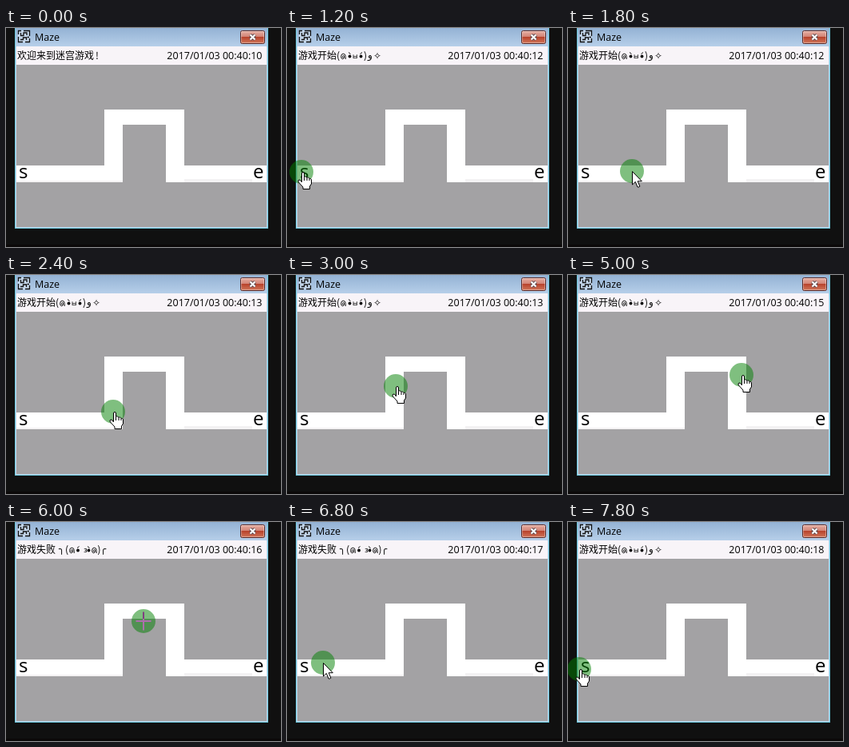
Write an HTML page that moves like this. It is 344 px wide and 274 px high and loops after 8 s.

```html
<!DOCTYPE html>
<html lang="zh-CN">
<head>
<meta charset="utf-8">
<title>Maze</title>
<style>
  html, body { margin: 0; width: 100%; height: 100%; overflow: hidden; background: #101010; }
  svg { display: block; width: 344px; height: 274px; }
  text { font: 12.5px "Open Sans", "Noto Sans", sans-serif; white-space: pre; }
  .zh { font: 12px "Noto Sans CJK SC", "Noto Sans CJK", sans-serif; }
  .sym { font: 12px "DejaVu Sans", sans-serif; }
  .mark { font-size: 24px; }
  .line { fill: none; stroke: #111; }
  .skin { fill: #fff; stroke: #000; }
  #cross { mix-blend-mode: difference; stroke: #fff; stroke-width: 2; }
</style>
</head>
<body>
<svg viewBox="0 0 344 274">
  <defs>
    <linearGradient id="bar" x2="0" y2="1">
      <stop stop-color="#94b2d4"/><stop offset="1" stop-color="#b8d0ea"/>
    </linearGradient>
    <linearGradient id="red" x2="0" y2="1">
      <stop stop-color="#e6b0a4"/><stop offset=".48" stop-color="#d28274"/>
      <stop offset=".5" stop-color="#b8432c"/><stop offset="1" stop-color="#d2785c"/>
    </linearGradient>
    <path id="curl" class="line" d="M3.6 6.2A1.3 1.3 0 1 1 4.6 4Q5 7.5 2.6 7.8Q.6 7.6.6 4.6Q.8 1.2 3.4 1.2Q6.3 1.4 6.2 4.6V8"/>
    <g id="eye"><circle cx="2.5" cy="5.5" r="1.9"/><path class="line" d="M1 .5L3.5 2.5"/></g>
  </defs>

  <rect width="344" height="274" fill="#101010"/>
  <rect y="271" width="344" height="3" fill="#0b0909"/>

  <!-- window -->
  <rect x="11" width="317" height="251" fill="#6cc8dc"/>
  <rect x="12" width="315" height="250" fill="#c2d8ee"/>
  <rect x="12" width="315" height="24" fill="url(#bar)"/>
  <rect x="13" y="23" width="313" height="23" fill="#f8f4f8"/>
  <rect x="13" y="46" width="313" height="203" fill="#a3a2a4"/>

  <rect x="15" y="3" width="15" height="15" fill="#c4d6ea"/>
  <path class="line" stroke-width="1.3" d="M19 3.5H15.5V8M22 3.5H29.5V10M15.5 11V17.5H21M24 17.5H29.5V13M18.5 6V9.5H22V6H26V9M18 14.5H21.5V12H25.5V15M26.5 11.5H29"/>
  <text x="36" y="16">Maze</text>
  <rect x="293.5" y="3.5" width="30" height="16" rx="2" fill="url(#red)" stroke="#5c2a28"/>
  <rect x="294.5" y="4.5" width="28" height="14" rx="1" fill="none" stroke="#fff" stroke-opacity=".35"/>
  <path d="M305.5 8.5L311.5 14.5M311.5 8.5L305.5 14.5" stroke="#5b4a50" stroke-width="4"/>
  <path d="M305.5 8.5L311.5 14.5M311.5 8.5L305.5 14.5" stroke="#fff" stroke-width="2.2"/>

  <!-- maze -->
  <path fill="#fff" d="M13 172H123V102H223V172H326V193H200V121H146V193H13Z"/>
  <path fill="#f3f2f3" d="M13 191H146V193H13ZM223 189H308V193H223Z"/>
  <text class="mark" x="16" y="188">s</text>
  <text class="mark" x="309" y="188">e</text>

  <!-- status line -->
  <text id="clock" x="320.5" y="39" text-anchor="end"></text>
  <g id="hello">
    <text class="zh" x="14" y="39">欢迎来到迷宫游戏</text>
    <text class="zh" x="112" y="39">!</text>
  </g>
  <g id="play">
    <text class="zh" x="14" y="39">游戏开始</text>
    <text class="zh" x="62" y="39">(</text>
    <use href="#curl" x="67" y="31"/>
    <use href="#eye" x="76" y="30"/>
    <text class="zh" x="81" y="39" style="font-size:9px">ㅂ</text>
    <use href="#eye" transform="matrix(-1 0 0 1 95 30)"/>
    <text class="zh" x="96" y="39">)</text>
    <text class="sym" x="101" y="38">و</text>
    <text class="sym" x="108" y="39">✧</text>
  </g>
  <g id="fail">
    <text class="zh" x="14" y="39">游戏失败</text>
    <text class="sym" x="66" y="38">╮</text>
    <text class="zh" x="74" y="39">(</text>
    <use href="#curl" x="79" y="31"/>
    <use href="#eye" transform="matrix(-1 0 0 1 92.500 30)"/>
    <text class="sym" x="97" y="38">₃</text>
    <use href="#eye" x="101" y="30"/>
    <use href="#curl" x="107" y="31"/>
    <text class="zh" x="114.500" y="39">)</text>
    <text class="sym" x="118" y="38">╭</text>
  </g>

  <!-- pointer -->
  <circle id="halo" r="15" fill="#008000" fill-opacity=".5"/>
  <path id="arrow" class="skin" d="M.5 .5V17L4.300 13.400L7 20H8.500L9.900 19.200L7.200 12.700H12.300Z"/>
  <path id="hand" class="skin" d="M.5 12.500V2Q.5 .5 2 .5T3.500 2V6.500Q4 5.500 5.500 6T7 7.500Q7.500 6.500 8.500 7T10 8.500Q10.500 8 11.500 8.500T12.500 10V15L10.500 18V21.500H2V19L-3.500 13Q-5 10.500-3 10T.5 13M3.500 6.500V11M7 7.500V11M10 8.500V11"/>
  <path id="cross" d="M0-11.500V11.500M-9.500 0H9.500"/>
</svg>
<script>
  const $ = id => document.getElementById(id);
  const LOOP = 8000, TICK = 200;
  const shapes = ['arrow', 'hand', 'cross'];
  const messages = ['hello', 'play', 'fail'];

  // tick, x, y; a position holds until the next entry
  const path = [
    [5, 11, 180], [6, 18, 180], [7, 33, 180], [8, 54, 179], [9, 80, 179], [10, 114, 181],
    [11, 129, 179], [12, 134, 171], [13, 135, 160], [14, 136, 149], [15, 136, 139], [16, 136, 130],
    [17, 140, 119], [18, 148, 113], [19, 160, 112], [20, 174, 111], [21, 190, 111], [22, 204, 112],
    [23, 213, 116], [24, 216, 121], [25, 217, 125], [26, 208, 127], [27, 180, 126],
    [30, 172, 124], [31, 158, 128], [32, 120, 142], [33, 78, 161], [34, 45, 176], [35, 26, 183],
    [39, 14, 184]
  ];

  function shapeAt(tick, x) {
    if (tick >= 27 && tick < 34) return 'cross';
    return x > 12 && x < 30 || x > 120 ? 'hand' : 'arrow';
  }

  function messageAt(tick) {
    if (tick < 6) return 'hello';
    return tick >= 27 && tick < 35 ? 'fail' : 'play';
  }

  function only(ids, chosen) {
    for (const id of ids) $(id).style.display = id === chosen ? '' : 'none';
  }

  let last = -1;
  function draw() {
    const tick = Math.floor(performance.now() % LOOP / TICK);
    if (tick !== last) {
      last = tick;
      $('clock').textContent = '2017/01/03 00:40:' + (10 + Math.floor((tick + 4) / 5));
      only(messages, messageAt(tick));
      const at = path.filter(p => p[0] <= tick).pop();
      $('halo').style.display = at ? '' : 'none';
      only(shapes, at && shapeAt(tick, at[1]));
      if (at) {
        for (const id of ['halo', ...shapes]) {
          $(id).setAttribute('transform', `translate(${at[1]} ${at[2]})`);
        }
      }
    }
    requestAnimationFrame(draw);
  }
  draw();
</script>
</body>
</html>
```
